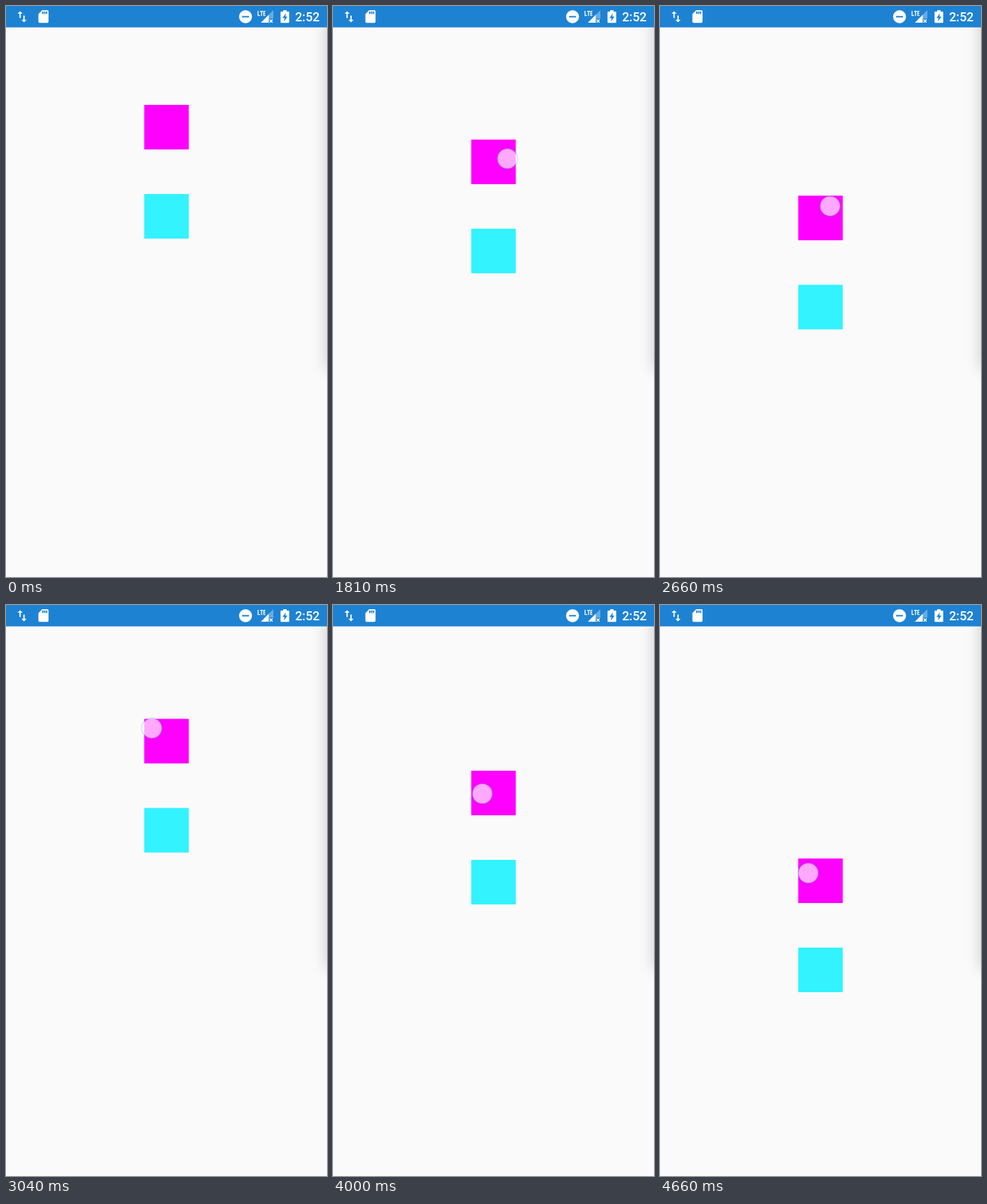
Write an HTML page that moves like this. It is 461 px wide and 820 px high and loops after 4.76 s.

```html
<!DOCTYPE html>
<html lang="en">
<head>
<meta charset="utf-8">
<title>Dragged squares</title>
<style>
  html, body { margin: 0; width: 100%; height: 100%; overflow: hidden; background: #fafafa; }
  #stage { position: relative; width: 461px; height: 820px; overflow: hidden; }
  .shade { position: absolute; left: 461px; top: -60px; width: 60px; height: 582px; box-shadow: 0 0 22px rgba(0, 0, 0, .2); }
  svg { position: absolute; left: 0; top: 0; }
  .clock { font: 500 17.93px Roboto, sans-serif; }
</style>
</head>
<body>
<div id="stage">
  <div class="shade"></div>
  <svg width="461" height="820" viewBox="0 0 461 820">
    <g id="squares" transform="translate(198.5 142)">
      <rect width="64" height="64" fill="#f0f"/>
      <rect y="128" width="64" height="64" fill="#32f3ff"/>
    </g>
    <g id="touch" visibility="hidden">
      <circle r="14.7" fill="none" stroke="#46aadc" stroke-opacity=".3" stroke-width="1.4"/>
      <circle r="14" fill="#fff" fill-opacity=".66"/>
    </g>

    <!-- status bar -->
    <rect width="461" height="30.7" fill="#1e82d3"/>
    <g fill="#fff">
      <path transform="translate(11.9 4.9) scale(.93 .88)" d="M16 17V10h-2v7h-3l4 4 4-4zM9 3L5 7h3v7h2V7h3z"/>
      <path transform="translate(42.9 4.2) scale(.91)" fill-rule="evenodd" d="M18 2h-8L4 8v12q0 2 2 2h12q2 0 2-2V4q0-2-2-2zM12 8h-2V4h2zM15 8h-2V4h2zM18 8h-2V4h2z"/>
      <circle cx="344" cy="15.4" r="9.3"/>
      <path d="M339 14.4h10v2h-10z" fill="#1e82d3"/>
      <path d="M362 7v6.6h2.8M365 7.6h4M367 7.6v6.6M372.6 7.6h-2.3v6h2.3M370.3 10.6h2" fill="none" stroke="#fff" stroke-width="1.3"/>
      <path d="M384 6v12.3h-6.6v-5.7z" fill-opacity=".33"/>
      <path d="M377.4 12.6V24H366z"/>
      <path d="M378.6 19.5l4.2 4.2m0-4.2l-4.2 4.2" stroke="#fff" stroke-width="1.4"/>
      <path d="M398 6h5v2h2.7q1 0 1 1v14.3q0 1-1 1h-10.4q-1 0-1-1V9q0-1 1-1h2.7z"/>
      <path d="M402 10.5l-5 6.7h3l-.8 5 5-6.9h-3z" fill="#1e82d3"/>
      <text class="clock" x="415.2" y="22.3">2:52</text>
    </g>
  </svg>
</div>
<script>
const LOOP = 4760, PRESS = 1390;

// time, top of the squares, finger x, finger y
const path = [
  [1390, 142, 239, 166],
  [1480, 142, 239.5, 168],
  [1560, 150, 241, 178],
  [1890, 211, 252, 238],
  [2160, 282.7, 251, 312.5],
  [2440, 325, 255, 349],
  [2720, 254, 240, 267],
  [2990, 176, 214, 190],
  [3040, 163.5, 209.5, 177],
  [3490, 66, 200, 90],
  [3540, 67, 202, 93],
  [3670, 106, 212, 136],
  [4000, 238, 214.5, 271],
  [4090, 272, 213, 302],
  [4550, 369, 212, 392],
  [4660, 364, 213, 385]
];

// screen refreshes: first, last, intervals
const bursts = [
  [1480, 1890, 9], [1940, 2430, 11], [2470, 2990, 11],
  [3040, 3540, 10], [3580, 4090, 11], [4140, 4660, 11]
];
const ticks = [0, PRESS];
for (const [first, last, n] of bursts)
  for (let i = 0; i <= n; i++)
    ticks.push(Math.round((first + (last - first) * i / n) / 10) * 10);

const slope = (i, c) => (path[i + 1][c] - path[i][c]) / (path[i + 1][0] - path[i][0]);

// tangent that never overshoots the points
function tangent(i, c) {
  if (i === 0 || i === path.length - 1) return slope(i ? i - 1 : 0, c);
  const a = slope(i - 1, c), b = slope(i, c);
  return a * b > 0 ? 2 * a * b / (a + b) : 0;
}

function valueAt(t, c) {
  let i = 0;
  while (i < path.length - 2 && path[i + 1][0] <= t) i++;
  const h = path[i + 1][0] - path[i][0], u = (t - path[i][0]) / h;
  const p = path[i][c], q = path[i + 1][c], v = 1 - u;
  return p * (1 + 2 * u) * v * v + q * u * u * (3 - 2 * u)
    + h * u * v * (tangent(i, c) * v - tangent(i + 1, c) * u);
}

const squares = document.getElementById("squares");
const touch = document.getElementById("touch");

function draw(now) {
  const t = now % LOOP;
  const shown = ticks.findLast(tick => tick <= t);
  const at = Math.max(shown, PRESS);
  squares.setAttribute("transform", `translate(198.5 ${valueAt(at, 1)})`);
  touch.setAttribute("transform", `translate(${valueAt(at, 2)} ${valueAt(at, 3)})`);
  touch.setAttribute("visibility", shown < PRESS ? "hidden" : "visible");
}

const start = performance.now();
function loop() {
  draw(performance.now() - start);
  requestAnimationFrame(loop);
}
loop();
</script>
</body>
</html>
```
